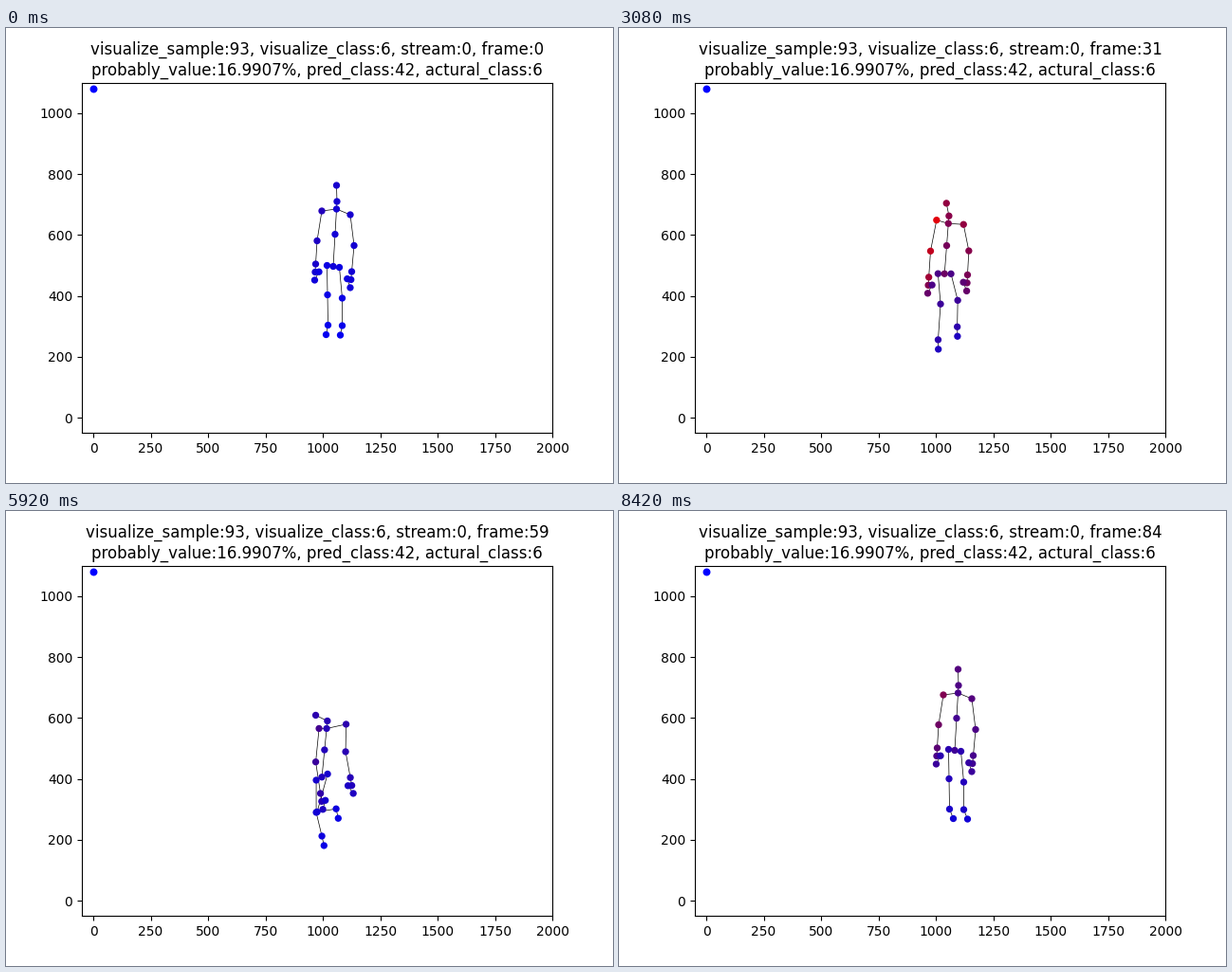
Write a matplotlib script that moves like this. It is 640x480 px and loops after 8.51 s.

```python
import numpy as np
import matplotlib.pyplot as plt
from matplotlib.animation import FuncAnimation
from matplotlib.collections import LineCollection

LOOP, INTERVAL = 8510, 37
LAST = 84
DRIFT = np.array([9.0, 1.0])  # slow walk of the whole body over one loop

# Main joints in stage pixels: standing, bent over, picking up, rising.
KEYS = {
    "head": [(348.5, 166), (319.5, 247.5), (324.5, 227.5), (316, 202)],
    "chest": [(348.5, 191), (328.5, 256.5), (335.5, 244.5), (328, 213)],
    "base": [(345, 251.5), (322.5, 284), (325.5, 292.5), (328, 267.5)],
    "l_hip": [(351.5, 252.5), (330.5, 281), (330.5, 291.5), (335, 262)],
    "r_shoulder": [(333, 193), (326.5, 234), (332.5, 220.5), (315, 237)],
    "r_elbow": [(328, 224.5), (315.5, 270.5), (324.5, 254.5), (316, 273.5)],
    "r_wrist": [(326.5, 249), (312.5, 308.5), (319.5, 292.5), (331, 302)],
    "l_shoulder": [(363, 197), (349.5, 240.5), (354.5, 227.5), (350, 221)],
    "l_elbow": [(367, 229.5), (360.5, 252.5), (351.5, 258.5), (352, 248)],
    "l_wrist": [(364.5, 257), (363, 270.5), (362.5, 279), (351, 282)],
    "r_knee": [(339, 281.5), (324.5, 322.5), (319.5, 325.5), (322, 309)],
    "r_ankle": [(339.5, 313.5), (328.5, 339.5), (328.5, 341.5), (325, 343)],
    "l_knee": [(354.5, 285), (351.5, 293.5), (324.5, 333.5), (319, 300)],
    "l_ankle": [(354.5, 314), (352.5, 315.5), (344.5, 318.5), (339, 308.5)],
}

SPINE = ["head", "neck", "chest", "mid", "base"]
ARM = ["shoulder", "elbow", "wrist", "hand", "tip", "thumb"]
LEG = ["hip", "knee", "ankle", "foot"]
NAMES = SPINE + [f"{side}_{part}" for limb in (ARM, LEG) for side in "rl" for part in limb]

CHAINS = [SPINE]
for side in "rl":
    arm = [f"{side}_{part}" for part in ARM]
    leg = [f"{side}_{part}" for part in LEG]
    CHAINS += [["chest"] + arm[:4] + [arm[5], arm[4]], ["base"] + leg]

# Upper joints glow more than lower ones, the right arm most.
leg_glow = np.linspace(0.6, 0.3, 4)
GLOW = np.concatenate([np.linspace(1, 0.8, 5), np.linspace(1.4, 0.6, 6),
                       np.linspace(1, 0.7, 6), leg_glow, leg_glow])


def key_point(name, step):
    phase = np.interp(step, [25, 43, 52, 66, LAST], range(5))
    if phase < 1:  # the feet step first, the body eases in
        phase **= 0.5 if "ankle" in name else 1.35
    path = np.array(KEYS[name] + KEYS[name][:1])
    point = [np.interp(phase, range(5), path[:, k]) for k in (0, 1)]
    return np.array(point) + DRIFT * step / LAST


def unit(v):
    return v / np.hypot(*v)


def joints_at(step):
    p = {name: key_point(name, step) for name in KEYS}
    p["neck"] = p["chest"] + 8 * unit(p["chest"] - p["base"])
    p["mid"] = p["chest"] + 0.44 * (p["base"] - p["chest"])
    p["r_hip"] = 2 * p["base"] - p["l_hip"]
    for side, inward in (("r", 1), ("l", -1)):
        wrist = p[f"{side}_wrist"]
        along = unit(wrist - p[f"{side}_elbow"])
        across = inward * np.array([along[1], -along[0]])
        p[f"{side}_hand"] = wrist + 8.5 * along
        p[f"{side}_tip"] = wrist + 17 * along
        p[f"{side}_thumb"] = wrist + 8 * along + 4 * across
        p[f"{side}_foot"] = p[f"{side}_ankle"] + [6 * step / LAST - 2, 10]
    return {name: to_data(*p[name]) for name in NAMES}


def to_data(x, y):
    return (x - 80) / 496 * 2050 - 50, 1100 - (y - 57.6) / 369.6 * 1150


def colors_at(step):
    level = np.interp(step, [0, 12, 31, 43, 52, 66, LAST],
                      [0.15, 0.36, 0.65, 0.65, 0.06, 0.45, 0.42])
    heat = np.clip(level * GLOW, 0, 1)
    return np.column_stack([heat ** 1.3, 0 * heat, (1 - heat) ** 1.3])


def step_at(ms):
    """Twelve ticks a second, with every sixth tick held."""
    tick = int((ms + 3.4) * 12 / 1000)
    return min(tick - (tick + 3) // 6, LAST)


fig, ax = plt.subplots(figsize=(6.4, 4.8), dpi=100)
ax.set_xlim(-50, 2000)
ax.set_ylim(-50, 1100)
title = ax.set_title("", fontsize=12)
bones = LineCollection([], colors="black", linewidths=0.5, zorder=2)
ax.add_collection(bones)
dots = ax.scatter(np.zeros(25), np.zeros(25), s=18, linewidths=1, zorder=3)
ax.plot([0], [1080], "o", color="blue", markersize=4.7, zorder=3)


def update(i):
    step = step_at(i * INTERVAL + INTERVAL - 1)
    joints = joints_at(step)
    bones.set_segments([[joints[name] for name in chain] for chain in CHAINS])
    dots.set_offsets([joints[name] for name in NAMES])
    dots.set_color(colors_at(step))
    title.set_text(f"visualize_sample:93, visualize_class:6, stream:0, frame:{step}\n"
                   "probably_value:16.9907%, pred_class:42, actural_class:6")
    return bones, dots, title


anim = FuncAnimation(fig, update, frames=LOOP // INTERVAL, interval=INTERVAL,
                     repeat=True, repeat_delay=0, blit=False)
plt.show()
```
